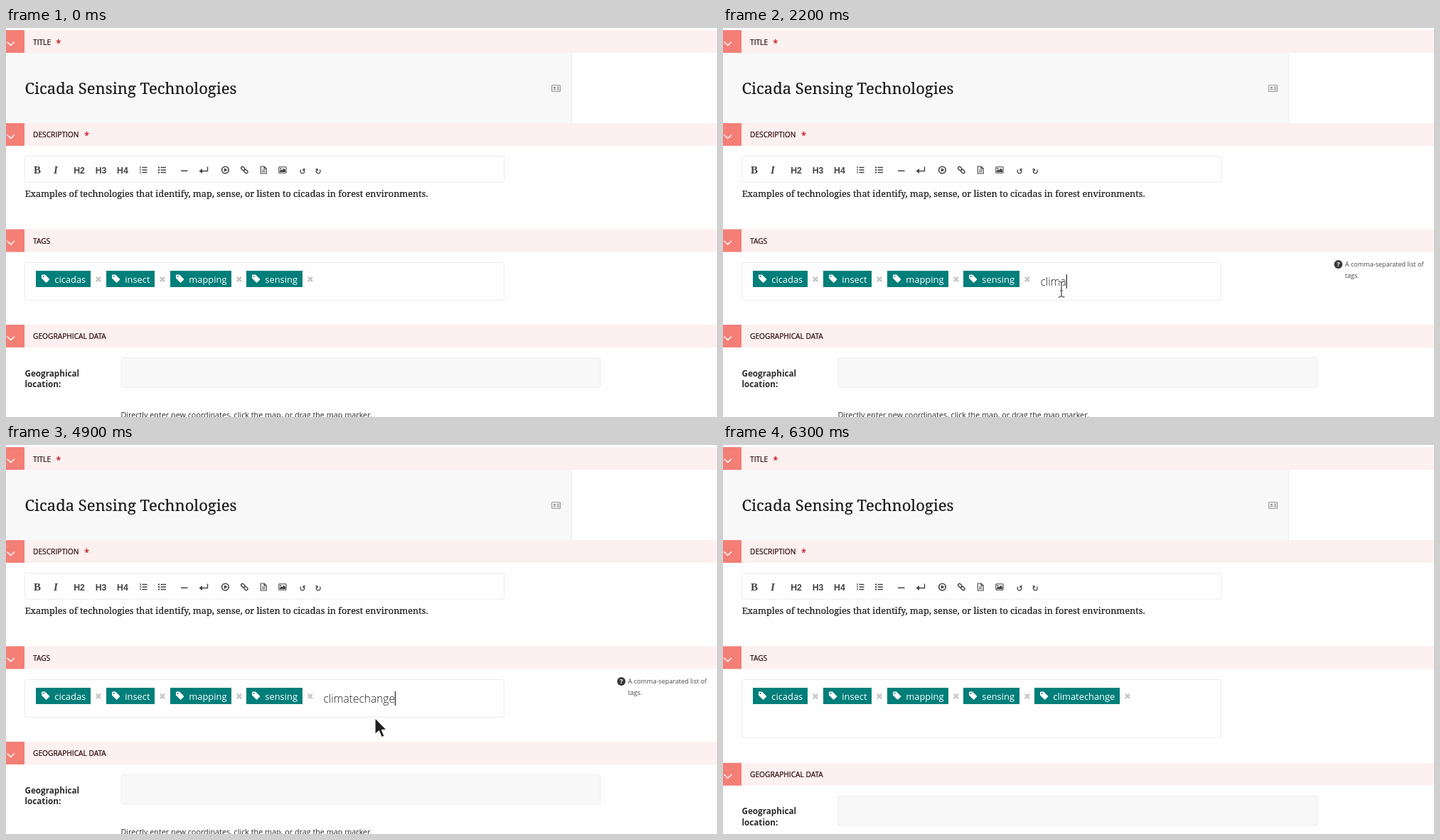
An HTML page that plays this animation: 1000x548 px, repeating every 6600 ms.

```html
<!DOCTYPE html>
<html lang="en">
<head>
<meta charset="utf-8">
<title>Adding a tag</title>
<style>
html, body { margin: 0; width: 100%; height: 100%; overflow: hidden; background: #fefefe; }
svg { display: block; width: 100vw; height: 100vh; font-family: "Open Sans", sans-serif; }
text { white-space: pre; }
.label { font-size: 10.2px; fill: #2b0508; stroke: #2b0508; stroke-width: .2; }
.star { font-size: 12px; fill: #c4161c; stroke: #c4161c; stroke-width: .3; }
.slab { font-family: "Noto Serif", serif; fill: #1a1a1a; stroke: #1a1a1a; stroke-width: .2; }
.tag { font-size: 12.9px; fill: #fff; }
.field { fill: #f9f8f9; stroke: #efeeee; }
.box { fill: #fefefe; stroke: #ececec; }
.head { font: 700 12.3px "Liberation Sans", sans-serif; }
.turn { font: 700 11px "DejaVu Sans", sans-serif; text-anchor: middle; }
.line { fill: none; stroke: #444; }
.help { font-size: 9.1px; fill: #4a4a4a; }
.bold { font-size: 11.7px; font-weight: 700; fill: #2b2b2b; }
</style>
</head>
<body>
<svg viewBox="0 0 1000 548" preserveAspectRatio="none">
  <defs>
    <g id="bar">
      <path d="M0 0H1000V32H0Z" fill="#fcf0f0"/>
      <path d="M0 0H26V32H0Z" fill="#f37f77"/>
      <path d="M1.5 16.5L6.7 21.5L12 16.5" fill="none" stroke="#fff" stroke-width="1.5"/>
    </g>
    <path id="beamShape" d="M-4.5 -11Q0 -11 0 -8.5Q0 -11 4.5 -11M0 -9V9M-4.5 11Q0 11 0 8.5Q0 11 4.5 11M-2 2H2"/>
  </defs>
  <path d="M0 0H1000V548H0Z" fill="#fefefe"/>

  <path d="M0 35H796V134H0Z" fill="#f9f8f9"/>
  <path d="M795.5 36V134" stroke="#eeecec"/>
  <use href="#bar" y="3"/>
  <text class="label" x="38" y="23.7">TITLE</text>
  <text class="star" x="70.6" y="25.7">*</text>
  <text class="slab" x="26.5" y="92.5" font-size="22">Cicada Sensing Technologies</text>
  <g fill="none" stroke="#999" stroke-width="1.2">
    <rect x="767.7" y="80.5" width="11.8" height="9" rx="1"/>
    <path d="M769.5 86.8H773.5M774.8 83.2H778M774.8 85.2H778M774.8 87.2H778"/>
    <path d="M770 84H773" stroke-width="2.6"/>
  </g>

  <use href="#bar" y="134"/>
  <text class="label" x="38" y="154.2">DESCRIPTION</text>
  <text class="star" x="110.2" y="156.2">*</text>
  <rect class="box" x="26.5" y="180.5" width="674.5" height="36.5" rx="2"/>
  <g fill="#444" stroke-width="1.4">
    <text x="39" y="205" font-family="Liberation Serif, serif" font-size="15" font-weight="700">B</text>
    <text x="67" y="205" font-family="Liberation Serif, serif" font-size="15" font-weight="700" font-style="italic">I</text>
    <text class="head" x="95.2" y="204.5">H2</text>
    <text class="head" x="125.7" y="204.5">H3</text>
    <text class="head" x="156" y="204.5">H4</text>
    <path class="line" d="M191.5 196.5H198.5M191.5 200H198.5M191.5 203.5H198.5M217.5 196.5H225M217.5 200H225M217.5 203.5H225"/>
    <path class="line" stroke-dasharray="2.6 .9" stroke-width="1.2" d="M189 195V205.2"/>
    <path class="line" stroke-dasharray="1.8 1.7" stroke-width="2" d="M215 195.6V205"/>
    <path class="line" d="M246 201.3H255.5M283.5 195.5V201.5H273"/>
    <path d="M271.5 201.5L276 198V205Z"/>
    <circle class="line" cx="308.4" cy="200" r="4.8" stroke-width="1.6"/>
    <path d="M306.8 197.2L311.6 200L306.8 202.8Z"/>
    <g class="line" transform="translate(335.3 200) rotate(45)">
      <rect x="-5.8" y="-2" width="5.8" height="4" rx="2"/>
      <rect x="0" y="-2" width="5.8" height="4" rx="2"/>
    </g>
    <path class="line" stroke-width="1.1" d="M358.3 195H363.2L366.2 198V205H358.3ZM363 195V198.3H366M360 200.3H364.5M360 202.5H364.5"/>
    <rect class="line" x="383.8" y="195.7" width="10.2" height="8.6" rx=".8" stroke-width="1.1"/>
    <path d="M385 203V201L387 199.2L388.2 200.3L390.8 197.8L393 200V203Z"/>
    <circle cx="386.3" cy="198" r="1"/>
    <text class="turn" x="417" y="206">↺</text>
    <text class="turn" x="439" y="206">↻</text>
  </g>
  <text class="slab" x="26.7" y="238" font-size="12.69">Examples of technologies that identify, map, sense, or listen to cicadas in forest environments.</text>

  <use href="#bar" y="283.5"/>
  <text class="label" x="38" y="303.7">TAGS</text>
  <rect id="tagBox" class="box" x="26.5" y="330.5" width="674" height="53" rx="3"/>
  <g id="tags"></g>
  <text id="typed" x="446.5" y="362.5" font-size="15.5" font-weight="300" fill="#222"></text>
  <path id="squiggle" d="M447 364.8H546" stroke="#e0443e" stroke-width="1.6" stroke-dasharray="1.7 1.2"/>
  <path id="caret" d="M.5 347V367" stroke="#222" stroke-width="1.2"/>
  <g id="help">
    <circle cx="865.4" cy="333" r="5.9" fill="#3a3a3a"/>
    <text x="865.4" y="336.4" font-size="9.5" font-weight="700" fill="#fff" text-anchor="middle">?</text>
    <text class="help" x="874.8" y="335.7">A comma-separated list of</text>
    <text class="help" x="874.8" y="351.7">tags.</text>
  </g>

  <g id="geo">
    <use href="#bar" y="418"/>
    <text class="label" x="38" y="438.2">GEOGRAPHICAL DATA</text>
    <text class="bold" x="26.5" y="490.5">Geographical</text>
    <text class="bold" x="26.5" y="506">location:</text>
    <rect class="field" x="162" y="464.5" width="674" height="41.5" rx="3"/>
    <text x="161.5" y="548.7" font-size="10.8" fill="#2b2b2b">Directly enter new coordinates, click the map, or drag the map marker.</text>
  </g>

  <g id="beam" fill="none">
    <use href="#beamShape" stroke="#fff" stroke-width="3.4"/>
    <use href="#beamShape" stroke="#747474" stroke-width="1.7"/>
  </g>
  <path id="arrow" d="M0 0V24L5.6 19L9.4 28L13.6 26.2L9.9 17.5H17Z" fill="#222" stroke="#fff" stroke-width="1.6" stroke-linejoin="round"/>
</svg>
<script>
const LOOP = 6600, ADDED = 6000, WORD = "climatechange";
const keyTimes = [1500, 1700, 1900, 2100, 2200, 2400, 2600, 2900, 3000, 3100, 3300, 3600, 3800];
const labels = [["cicadas", 42, 77], ["insect", 141, 68], ["mapping", 231, 86],
  ["sensing", 338, 79], [WORD, 438, 120]];
// Cursor stops: time, x, y
const stops = [[0, 735, 575], [500, 474, 373], [600, 476, 368], [4700, 476, 368],
  [5400, 692, 449], [5900, 692, 449], [6300, 735, 575]];

const el = id => document.getElementById(id);
const show = (id, on) => { el(id).style.display = on ? "" : "none"; };
const place = (id, x, y) => el(id).setAttribute("transform", `translate(${x} ${y})`);
const within = (t, a, b) => t >= a && t < b;

el("tags").innerHTML = labels.map(([name, x, w], i) => `<g id="tag${i}" transform="translate(${x} 342)">
  <rect width="${w}" height="23" fill="#007e7a"/>
  <path d="M8 6.5Q8 5.5 9 5.5H13L19 11.5Q19.6 12.1 19 12.7L15.2 16.5Q14.6 17.1 14 16.5L8 10.5Z" fill="#fff"/>
  <circle cx="10.5" cy="8" r="1" fill="#007e7a"/>
  <text class="tag" x="26.3" y="16.5">${name}</text>
  <path d="M${w + 7.7} 8.7l6.4 6.4m0 -6.4l-6.4 6.4" stroke="#c4c4c4" stroke-width="2.3"/></g>`).join("");

function cursorAt(t) {
  const i = Math.max(1, stops.findIndex(s => s[0] >= t));
  const [t0, x0, y0] = stops[i - 1], [t1, x1, y1] = stops[i];
  const u = (t - t0) / (t1 - t0), e = u * u * (3 - 2 * u);
  return [x0 + (x1 - x0) * e, y0 + (y1 - y0) * e];
}

function draw(now) {
  const t = Math.floor(now % LOOP / 100) * 100;
  const added = t >= ADDED;

  const typed = el("typed");
  typed.textContent = added ? "" : WORD.slice(0, keyTimes.filter(k => k <= t).length);
  const end = typed.textContent ? typed.getComputedTextLength() : 0;
  place("caret", 446.5 + end, 0);
  show("caret", within(t, 800, 1300) || within(t, 1500, 4300) || within(t, 4800, 5300));
  show("squiggle", within(t, 5300, ADDED));
  show("help", within(t, 400, ADDED));

  show("tag4", added);
  el("tagBox").setAttribute("height", added ? 81.5 : 53);
  place("geo", 0, added ? 29.8 : 0);

  const visible = within(t, 100, 3000) || within(t, 4800, 6300);
  const [x, y] = cursorAt(Math.min(t, 6300));
  const overField = y < 384;
  show("beam", visible && overField);
  show("arrow", visible && !overField);
  place("beam", x, y);
  place("arrow", x, y);
}

let start;
function tick(now) {
  start ??= now;
  draw(now - start);
  requestAnimationFrame(tick);
}
draw(0);
requestAnimationFrame(tick);
</script>
</body>
</html>
```
